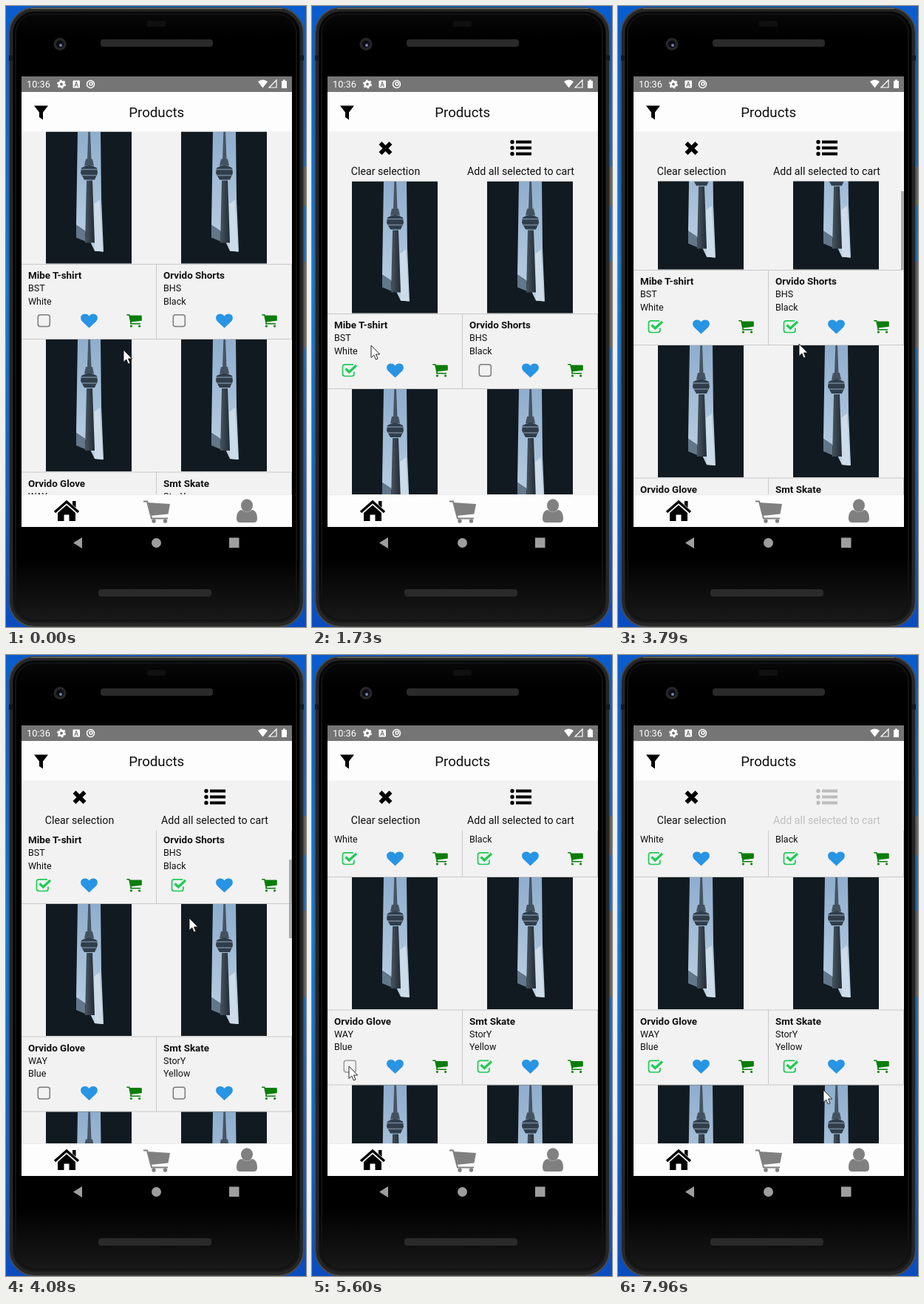
Recreate the animation shown at these times as an HTML page. Size 406 px wide and 838 px high, loop 8000 ms.

```html
<!DOCTYPE html>
<html lang="en">
<head>
<meta charset="utf-8">
<title>Product selection</title>
<style>
  html, body { margin: 0; width: 100%; height: 100%; overflow: hidden; background: #000; }
  #stage { display: block; width: 100vw; height: 100vh; }
  text { font-family: Roboto, sans-serif; fill: #101010; }
  .name { font-size: 13.4px; font-weight: 700; }
  .info { font-size: 12.5px; }
  .action { font-size: 14.2px; text-anchor: middle; }
  .title { font-size: 18.7px; text-anchor: middle; }
</style>
</head>
<body>
<svg id="stage" viewBox="0 0 406 838" preserveAspectRatio="none">
  <defs>
    <linearGradient id="desk" x2="0" y2="1">
      <stop offset="0" stop-color="#0a5ccc"/><stop offset=".45" stop-color="#0c7ce0"/>
      <stop offset=".75" stop-color="#0a66d4"/><stop offset="1" stop-color="#0a4cc0"/>
    </linearGradient>
    <linearGradient id="body" x2="0" y2="1">
      <stop offset="0" stop-color="#0a0a0a"/><stop offset=".05" stop-color="#000"/>
      <stop offset=".89" stop-color="#000"/><stop offset="1" stop-color="#1c1c1c"/>
    </linearGradient>
    <linearGradient id="sky" x2="0" y2="1">
      <stop offset="0" stop-color="#8fadcd"/><stop offset="1" stop-color="#bcd2e4"/>
    </linearGradient>
    <linearGradient id="shaft">
      <stop offset="0" stop-color="#48545f"/><stop offset="1" stop-color="#222c36"/>
    </linearGradient>

    <g id="photo">
      <path d="M0 0H116V178H0z" fill="#111a20"/>
      <path d="M43 0H74L75 90 78 162 66 161 53 134 41 126z" fill="url(#sky)"/>
      <path d="M65 98L73 92 77 162 66 161z" fill="#cddce8"/>
      <path d="M41 126L53 134V148L41 143z" fill="#62778a"/>
      <path d="M57.300 0H60L61.500 38H56z" fill="#465463"/>
      <path d="M55 66H63L66 150H53z" fill="url(#shaft)"/>
      <path d="M54 37H63L65 46H52z" fill="#445260"/>
      <path d="M48 49Q58.500 42 69 49L70 56 66 65H52L47 56z" fill="#303d4a"/>
      <path d="M48 51H69M49 59H68" stroke="#71869a" stroke-width="1.500"/>
    </g>
    <g id="heart">
      <path d="M11.500 19L2 10C-1.500 6 0 0 6 0c3 0 4.500 1.800 5.500 3C12.500 1.800 14 0 17 0c6 0 7.500 6 4 10z" fill="#2794e4"/>
    </g>
    <g id="cart" fill="#0a7d0a" transform="scale(.0125)">
      <path d="M64 64H310L500 964 460 1024H1470" fill="none" stroke="#0a7d0a" stroke-width="128" stroke-linecap="round" stroke-linejoin="round"/>
      <path d="M340 128H1600L1664 180V670L1610 705 480 835z"/>
      <circle cx="512" cy="1280" r="128"/><circle cx="1408" cy="1280" r="128"/>
    </g>
    <rect id="empty" x=".8" y=".8" width="16" height="15.600" rx="3" fill="none" stroke="#7a7a7a" stroke-width="1.500"/>
    <g id="checked" fill="none" stroke="#1dcb55">
      <path d="M13.500 .9H2Q-1 .9-1 4V13.500Q-1 16.500 2 16.500H11.500Q14.500 16.500 14.500 13.500V10.500" stroke-width="1.700"/>
      <path d="M3 6.500L7.800 11 17.500 2" stroke-width="3.200"/>
    </g>
  </defs>

  <!-- phone -->
  <path d="M0 0H406V838H0z" fill="url(#desk)"/>
  <path d="M402 217h4v53h-4zM402 345h4v116h-4z" fill="#6a665e"/>
  <rect x="4.500" y="2.500" width="398" height="835" rx="34" fill="url(#body)" stroke="#4a4a48" stroke-width="2"/>
  <rect x="7.500" y="5.500" width="392" height="829" rx="31" fill="none" stroke="#262626" stroke-width="4"/>
  <rect x="13" y="11" width="380" height="818" rx="26" fill="none" stroke="#121212" stroke-width="2"/>
  <path d="M34 3.500H374" stroke="#6e6e6a"/>
  <path d="M4 70h5M398 70h5" stroke="#181818" stroke-width="7"/>
  <g fill="#2a2a2a">
    <rect x="128" y="45" width="152" height="10" rx="4"/>
    <rect x="125" y="787" width="153" height="10" rx="4"/>
    <rect x="191" y="20" width="25" height="8" rx="2" fill="#101010"/>
    <circle cx="73" cy="51.500" r="8.500" fill="#262628"/>
    <circle cx="73" cy="51.500" r="5" fill="#0b0c14"/>
    <circle cx="74" cy="53" r="2" fill="#7484b0"/>
  </g>

  <!-- screen -->
  <path d="M21 95H387V703H21z" fill="#f2f2f2"/>
  <svg x="21" y="169" width="366" height="490" viewBox="21 169 366 490">
    <g id="list"></g>
    <rect id="scrollbar" x="383" width="4" height="106" fill="#808080" opacity="0"/>
  </svg>
  <g id="bar">
    <path d="M21 169H387V236.500H21z" fill="#f2f2f2"/>
    <path d="M92.500 185L106.500 199M106.500 185L92.500 199" stroke="#000" stroke-width="5.600"/>
    <text class="action" x="99.500" y="228">Clear selection</text>
    <g id="addAll">
      <path d="M276 183.500h21M276 191.500h21M276 199.500h21" stroke="#000" stroke-width="4"/>
      <path d="M271 183.500h0M271 191.500h0M271 199.500h0" stroke="#000" stroke-width="5.400" stroke-linecap="round"/>
      <text class="action" x="282.500" y="228">Add all selected to cart</text>
    </g>
  </g>

  <!-- status bar and header -->
  <path d="M21 95H387V116H21z" fill="#757575"/>
  <g fill="#fff">
    <text x="28" y="110" font-size="12.800" style="fill:#fff">10:36</text>
    <circle cx="75" cy="105.500" r="3.300" fill="none" stroke="#fff" stroke-width="2.800"/>
    <circle cx="75" cy="105.500" r="5.200" fill="none" stroke="#fff" stroke-width="1.600" stroke-dasharray="2.700"/>
    <rect x="90.500" y="100.500" width="9.500" height="10" rx="1"/>
    <text x="95.200" y="108.800" font-size="8.500" font-weight="700" text-anchor="middle" style="fill:#757575">A</text>
    <circle cx="114.500" cy="105.500" r="5" fill="none" stroke="#fff" stroke-width="1.500"/>
    <circle cx="115" cy="105" r="2" fill="none" stroke="#fff" stroke-width="1.500"/>
    <path d="M341 102Q347.500 97 354 102L347.500 110.500z"/>
    <path d="M366 100V110H356z" fill="none" stroke="#fff" stroke-width="1.200"/>
    <path d="M373 101h2v-1.500h3v1.500h2v10h-7z"/>
  </g>
  <path d="M21 116H387V169.500H21z" fill="#fdfdfe"/>
  <path d="M38 134.500H57L50 143.500V153.500L45 150V143.500z"/>
  <text class="title" x="203.700" y="150">Products</text>

  <!-- tabs -->
  <path d="M21 659H387V703H21z" fill="#fdfdfe"/>
  <path d="M21 659.500H387" stroke="#ececec"/>
  <path d="M66 683L82 669 98 683" fill="none" stroke="#000" stroke-width="3.400"/>
  <path d="M90 668h4.500v9l-4.500-4zM70 684L82 673.500 94 684V695H85.500V686.500H78.500V695H70z"/>
  <g fill="#808080">
    <path d="M186 668.500H191L197 691.500H219" fill="none" stroke="#808080" stroke-width="2"/>
    <path d="M191 670L222 672 219.500 685.500 195.500 688z"/>
    <circle cx="200" cy="695" r="2.700"/><circle cx="215.500" cy="695" r="2.700"/>
    <path d="M319 680C313 681 312 687 312 692Q312 697 317 697H335Q340 697 340 692C340 687 339 681 333 680Q326 686 319 680z"/>
    <ellipse cx="326" cy="674" rx="8" ry="8.800"/>
  </g>
  <g fill="#9e9e9e">
    <path d="M91 724.500L103 717V732z"/>
    <circle cx="203.500" cy="724.500" r="6.500"/>
    <path d="M302 717.500h13.500v13.500h-13.500z"/>
  </g>

  <path id="cursor" d="M0 0V16.500L3.800 13 6.400 19 9 17.900 6.500 12H11.700z" fill="#fff" stroke="#111" stroke-width=".9"/>
</svg>

<script>
const LOOP = 8000, ROW = 280.5, COLUMN = 183, BAR_HEIGHT = 67;
const BAR_SHOWN = 1520, SCROLL_START = 3540, SCROLL_END = 4270, SCROLL_LENGTH = 217;

// Press and release times of each product's checkbox.
const products = [
  { name: 'Mibe T-shirt', code: 'BST', color: 'White', press: 1150, release: 1400 },
  { name: 'Orvido Shorts', code: 'BHS', color: 'Black', press: 2450, release: 2700 },
  { name: 'Orvido Glove', code: 'WAY', color: 'Blue', press: 5550, release: 5720 },
  { name: 'Smt Skate', code: 'StorY', color: 'Yellow', press: 4880, release: 5060 },
  { name: '', code: '', color: '' },
  { name: '', code: '', color: '' },
];

// Pointer stops: time, x, y.
const pointerStops = [
  [130, 159, 464], [900, 56, 424], [1180, 52, 424], [1350, 67, 450],
  [1750, 80, 458], [2400, 236, 488], [2750, 237, 488], [3300, 243, 520],
  [SCROLL_START, 243, 520], [4140, 248, 350], [4300, 248, 350],
  [4780, 238, 555], [5020, 238, 555], [5480, 50, 555], [5800, 50, 555],
  [6480, 305, 338], [6900, 284, 205], [7380, 284, 205],
  [7700, 309, 308], [7960, 278, 587],
];

const $ = id => document.getElementById(id);
const clamp = v => Math.min(1, Math.max(0, v));
const progress = (t, from, to) => clamp((t - from) / (to - from));
const smooth = (t, from, to) => {
  const u = progress(t, from, to);
  return u * u * (3 - 2 * u);
};
const pressOpacity = (t, press, release) =>
  1 - 0.78 * (progress(t, press, press + 150) - progress(t, release, release + 250));

$('list').innerHTML = products.map((p, i) => `
  <g transform="translate(${i % 2 * COLUMN} ${Math.floor(i / 2) * ROW})">
    <use href="#photo" x="54" y="169.5"/>
    <path d="M21 348.5H204M21 449.500H204M203.500 348V449" stroke="#c8c8c8"/>
    <text class="name" x="30" y="368">${p.name}</text>
    <text class="info" x="30" y="385">${p.code}</text>
    <text class="info" x="30" y="402.500">${p.color}</text>
    <use class="box" x="42.500" y="416"/>
    <use href="#heart" x="101" y="415.500"/>
    <use href="#cart" x="163" y="416"/>
  </g>`).join('');
const boxes = [...document.querySelectorAll('.box')];

function pointerAt(t) {
  const next = pointerStops.findIndex(stop => stop[0] > t);
  if (next < 1) return pointerStops.at(next).slice(1);
  const [t0, x0, y0] = pointerStops[next - 1], [t1, x1, y1] = pointerStops[next];
  const u = smooth(t, t0, t1);
  return [x0 + (x1 - x0) * u, y0 + (y1 - y0) * u].map(Math.round);
}

function draw(t) {
  const barShown = t >= BAR_SHOWN;
  const scroll = Math.round(SCROLL_LENGTH * smooth(t, SCROLL_START, SCROLL_END));
  $('list').setAttribute('transform', `translate(0 ${(barShown ? BAR_HEIGHT : 0) - scroll})`);
  $('bar').setAttribute('visibility', barShown ? 'visible' : 'hidden');
  $('addAll').setAttribute('opacity', pressOpacity(t, 7250, LOOP));

  const scrollbarOpacity = progress(t, SCROLL_START, SCROLL_START + 40) - progress(t, 4870, 5120);
  $('scrollbar').setAttribute('y', 237.3 + scroll * 0.2152);
  $('scrollbar').setAttribute('opacity', 0.6 * scrollbarOpacity);

  products.forEach(({ press = Infinity, release = Infinity }, i) => {
    const pressed = t >= press;
    boxes[i].setAttribute('href', t >= release + 100 ? '#checked' : '#empty');
    boxes[i].setAttribute('opacity', pressed ? pressOpacity(t, press, release) : 1);
  });
  $('cursor').setAttribute('transform', `translate(${pointerAt(t)})`);
}

const start = performance.now();
function tick() {
  draw((performance.now() - start) % LOOP);
  requestAnimationFrame(tick);
}
tick();
</script>
</body>
</html>
```
